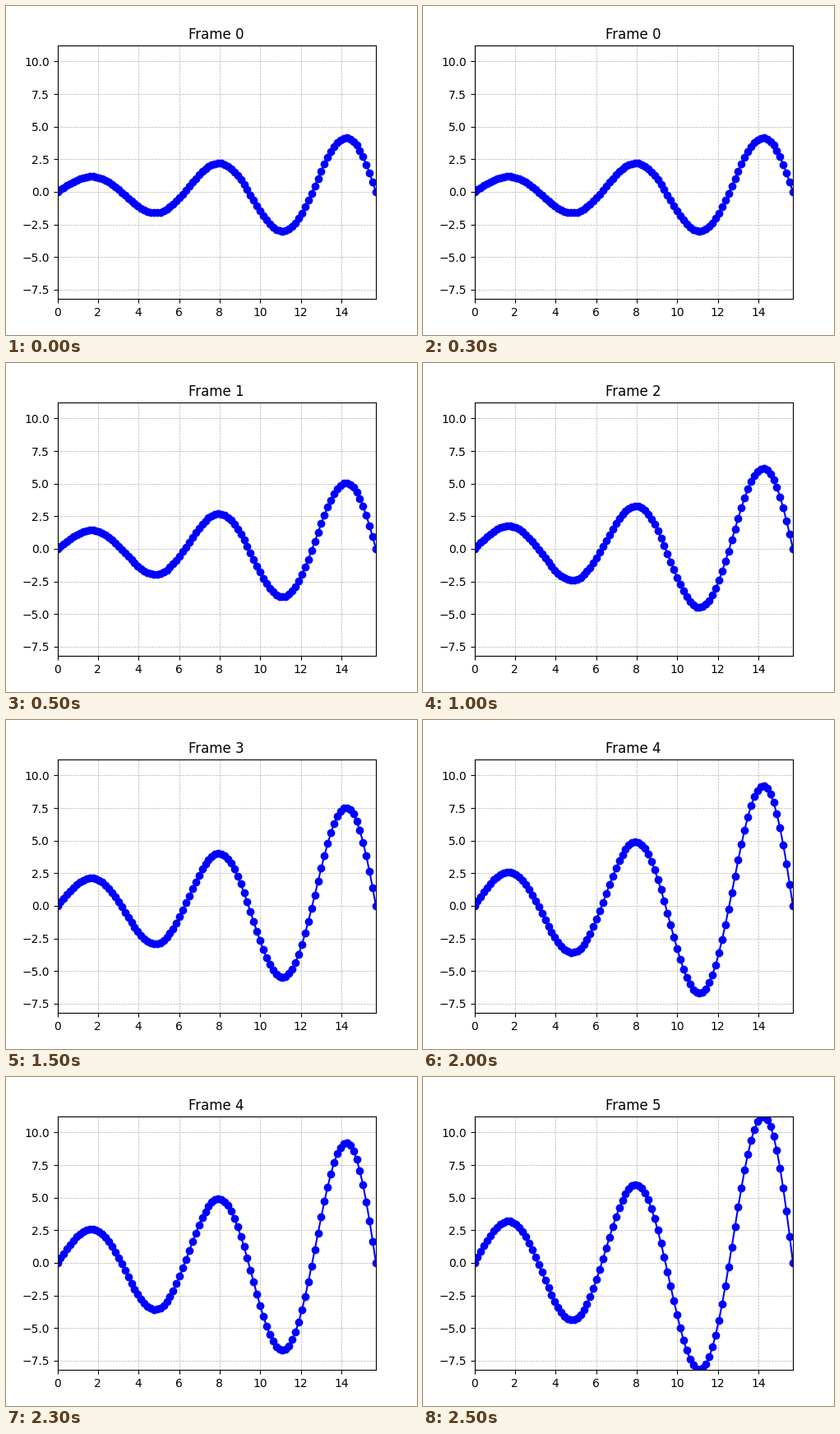
These frames come from a looping animation (500x400 px, 3000 ms). A matplotlib script:

```python
import numpy as np
import matplotlib.pyplot as plt
from matplotlib.animation import FuncAnimation

FRAMES = 6
INTERVAL = 500  # ms

x = np.linspace(0, 5 * np.pi, 100)


def wave(step):
    """Sine with an exponential envelope that grows each step."""
    return np.exp(0.1 * x + 0.2 * step) * np.sin(x)


fig, ax = plt.subplots(figsize=(5, 4), dpi=100)
line, = ax.plot(x, wave(0), "bo-")
title = ax.set_title("Frame 0")

largest = wave(FRAMES - 1)
ax.set_xlim(x[0], x[-1])
ax.set_ylim(largest.min(), largest.max())
ax.grid(linestyle="--", linewidth=0.5)


def update(step):
    line.set_ydata(wave(step))
    title.set_text(f"Frame {step}")
    return line, title


anim = FuncAnimation(fig, update, frames=FRAMES, interval=INTERVAL,
                     repeat=True, repeat_delay=0)
plt.show()
```
